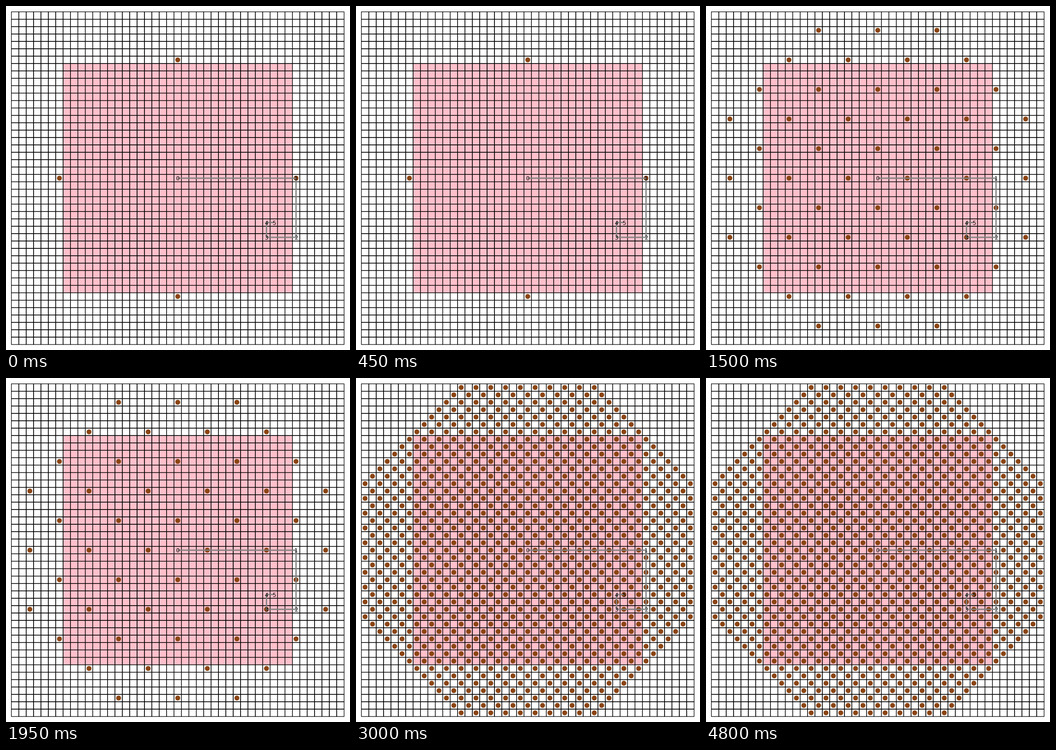
A matplotlib script for the animation above (6 s loop, 748x748 px).

```python
import numpy as np
import matplotlib.pyplot as plt
from matplotlib.animation import FuncAnimation
from matplotlib.collections import PatchCollection
from matplotlib.patches import Circle, Rectangle

SIZE = 748
DPI = 100
CELL = 16.077
CENTER_X, CENTER_Y = 373.43, 374.35   # pixels from the top left corner
REACH = 22                            # cells from the middle to the border
DOT_RADIUS = 1 / 3
STEPS = [16, 8, 4, 2, 1]
PATH = [(0, 0), (16, 0), (16, -8), (12, -8), (12, -6), (13, -6)]


def px(pixels):
    """Pixels as points, the unit of line widths and font sizes."""
    return pixels * 72 / DPI


def square(x, y, half):
    return Rectangle((x - half, y - half), 2 * half, 2 * half)


def points_after(step):
    """Ends of all walks that take steps of 16, 8, ... down to `step`."""
    diagonal = np.arange(step - 32, 32, 2 * step)
    u, v = np.meshgrid(diagonal, diagonal)
    points = np.column_stack([(u + v).ravel(), (u - v).ravel()]) // 2
    return points[np.abs(points).max(axis=1) <= REACH]


fig = plt.figure(figsize=(SIZE / DPI, SIZE / DPI), dpi=DPI, facecolor="white")
ax = fig.add_axes([0, 0, 1, 1])
ax.set_xlim(-CENTER_X / CELL, (SIZE - CENTER_X) / CELL)
ax.set_ylim((CENTER_Y - SIZE) / CELL, CENTER_Y / CELL)
ax.axis("off")

field = square(0, 0, 15.5)
field.set(facecolor="pink", linewidth=0, snap=False, zorder=1)
ax.add_patch(field)

# Every cell has its own outline, so neighbours share a doubled edge.
axis = range(-REACH, REACH + 1)
cells = PatchCollection([square(x, y, 0.5) for x in axis for y in axis],
                        facecolor="none", edgecolor="black",
                        linewidth=px(1.25), snap=False, zorder=2)
ax.add_collection(cells, autolim=False)

dots = PatchCollection([], facecolor="saddlebrown", edgecolor="none",
                       snap=False, zorder=3)
ax.add_collection(dots, autolim=False)

ax.plot(*zip(*PATH), color="gray", lw=px(2.7), solid_joinstyle="miter",
        solid_capstyle="butt", snap=False, scalex=False, scaley=False, zorder=4)
for number, (x, y) in enumerate(PATH):
    ax.text(x, y, str(number), family="DejaVu Sans", size=px(12),
            color="black", ha="center", va="center_baseline", zorder=5)


def update(frame):
    step = STEPS[min(frame, len(STEPS) - 1)]
    dots.set_paths([Circle(point, DOT_RADIUS) for point in points_after(step)])
    return [dots]


anim = FuncAnimation(fig, update, frames=8, interval=750, repeat=True)
plt.show()
```
